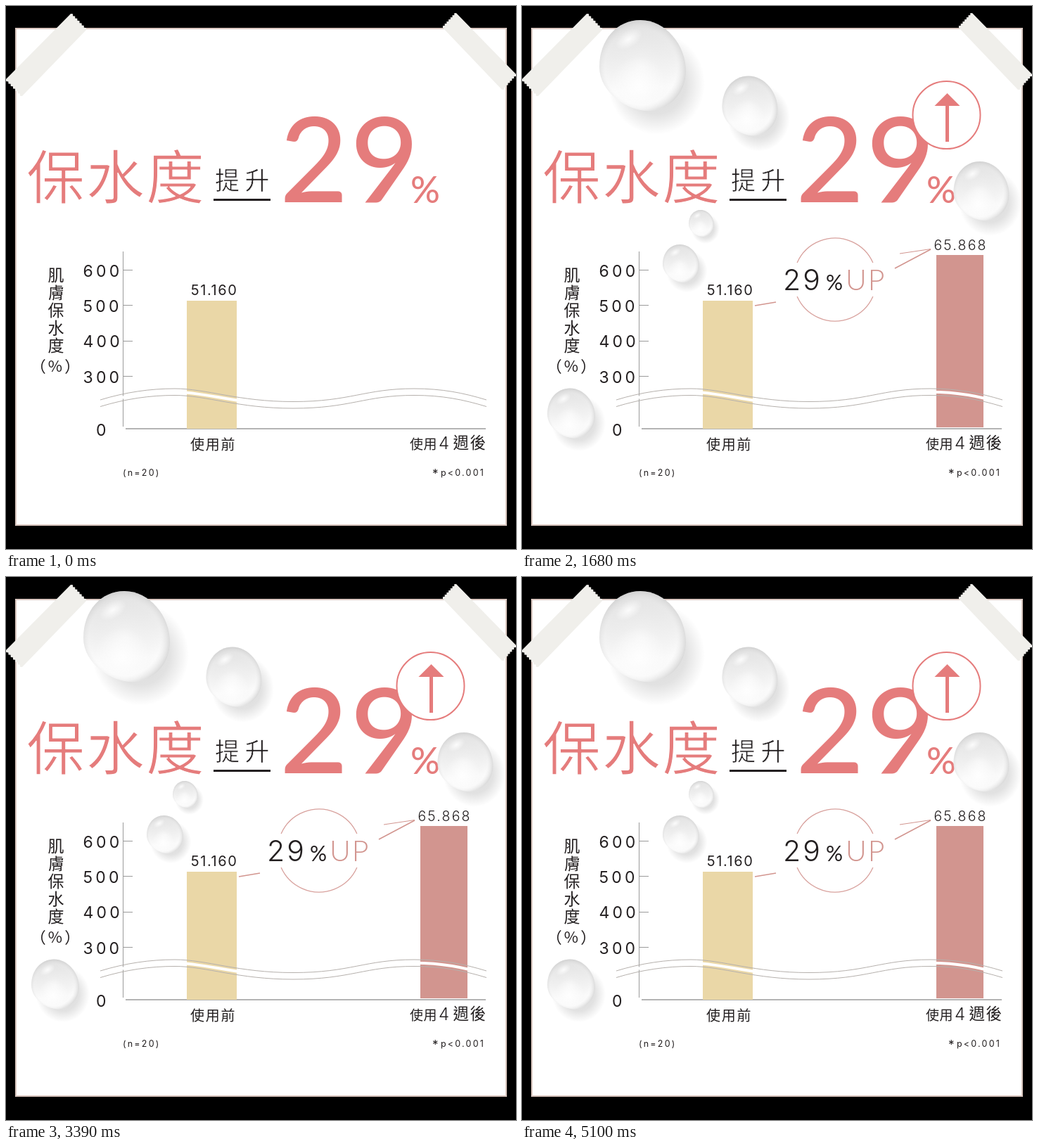
Recreate the animation shown at these times as an HTML page with a canvas. Size 725x772 px, loop 5.13 s.

```html
<!DOCTYPE html>
<html lang="zh-Hant">
<head>
<meta charset="utf-8">
<title>保水度提升</title>
<style>
html, body { margin: 0; width: 100%; height: 100%; overflow: hidden; background: #000; }
canvas { display: block; }
</style>
</head>
<body>
<canvas id="stage" width="725" height="772"></canvas>
<script>
const ctx = document.getElementById('stage').getContext('2d');
const CYCLE = 1710, STEP = 30;
const CORAL = '#e57c7c', INK = '#231f20', ROSE = '#d2958f', GREY = '#9b9b9b';
const CJK = '"Noto Sans CJK TC", "Noto Sans CJK", sans-serif';
const LATO = 'Lato, sans-serif', INTER = 'Inter, sans-serif';

const clamp = v => Math.max(0, Math.min(1, v));
const ramp = (t, a, b) => clamp((t - a) / (b - a));
const smooth = u => u * u * (3 - 2 * u);
const easeOut = u => 1 - (1 - u) ** 3;
const mix = (a, b, u) => a + (b - a) * u;

// Places the visible left edge (or middle) of the text at x.
function text(str, x, y, font, color = INK, spacing = 0, centred = false) {
  ctx.font = font;
  ctx.letterSpacing = spacing + 'px';
  ctx.fillStyle = color;
  const m = ctx.measureText(str);
  let left = x + m.actualBoundingBoxLeft;
  if (centred) left = x - (m.actualBoundingBoxRight - m.actualBoundingBoxLeft) / 2;
  ctx.fillText(str, left, y);
  return left;
}

// Text on white whose strokes are slimmed by a white outline.
function slimText(str, x, y, font, color, spacing, slim) {
  const left = text(str, x, y, font, color, spacing);
  ctx.strokeStyle = '#fff';
  ctx.lineWidth = slim;
  ctx.lineJoin = 'round';
  ctx.strokeText(str, left, y);
}

function line(x1, y1, x2, y2, color, width = 1) {
  ctx.strokeStyle = color;
  ctx.lineWidth = width;
  ctx.beginPath();
  ctx.moveTo(x1, y1);
  ctx.lineTo(x2, y2);
  ctx.stroke();
}

function faded(alpha, draw) {
  if (alpha <= 0) return;
  ctx.save();
  ctx.globalAlpha = alpha;
  draw();
  ctx.restore();
}

// A strip between two torn ends, each given as x1, y1, x2, y2.
function tape(a, b) {
  const torn = ([x1, y1, x2, y2]) => {
    const len = Math.hypot(x2 - x1, y2 - y1);
    for (let i = 0; i <= 14; i++) {
      const d = i % 2 ? 2 : 0;
      ctx.lineTo(mix(x1, x2, i / 14) + (y2 - y1) / len * d,
                 mix(y1, y2, i / 14) - (x2 - x1) / len * d);
    }
  };
  ctx.fillStyle = '#f0efeb';
  ctx.beginPath();
  torn(a);
  torn(b);
  ctx.fill();
}

function card() {
  ctx.fillStyle = '#000';
  ctx.fillRect(0, 0, 725, 772);
  ctx.fillStyle = '#fff';
  ctx.fillRect(13, 31, 699, 708);
  ctx.strokeStyle = '#d9c6bf';
  ctx.lineWidth = 2;
  ctx.strokeRect(14, 32, 697, 706);
}

function headline() {
  slimText('保水度', 30, 274, `400 83px ${CJK}`, CORAL, 2, 1.2);
  slimText('提升', 298, 261, `400 35px ${CJK}`, INK, 7.5, .7);
  ctx.fillStyle = INK;
  ctx.fillRect(295, 274, 81, 3);
  text('29', 396, 279, `500 168px ${LATO}`, CORAL, 3);
  text('%', 577, 280, `500 52px ${LATO}`, CORAL);
}

function wave(dy, color, width) {
  ctx.strokeStyle = color;
  ctx.lineWidth = width;
  ctx.beginPath();
  ctx.moveTo(134, 560 + dy);
  ctx.bezierCurveTo(170, 549 + dy, 205, 544 + dy, 240, 544 + dy);
  ctx.bezierCurveTo(285, 544 + dy, 330, 562.5 + dy, 408, 562.5 + dy);
  ctx.bezierCurveTo(490, 562.5 + dy, 510, 544 + dy, 580, 544 + dy);
  ctx.bezierCurveTo(620, 544 + dy, 650, 550 + dy, 683, 560 + dy);
  ctx.stroke();
}

function chart(t) {
  line(166.5, 349, 166.5, 598, GREY);
  line(170, 601, 682, 601, GREY, 1.4);
  [600, 500, 400, 300].forEach((n, i) => {
    const y = 375 + i * 50.4;
    line(166, Math.round(y) + .5, 180, Math.round(y) + .5, GREY);
    text(String(n), 110.5, y + 9.5, `400 23px ${INTER}`, INK, 4.2);
  });
  text('0', 129, 611, `400 23px ${INTER}`);

  [...'肌膚保水度'].forEach((c, i) =>
    text(c, 71, 390.5 + i * 25.2, `400 23px ${CJK}`, INK, 0, true));
  text('（%）', 70, 520, `400 22px ${CJK}`, INK, 3, true);

  ctx.fillStyle = '#ead7a7';
  ctx.fillRect(257, 419, 71, 182);
  const h = 245 * easeOut(ramp(t, 0, 450));
  ctx.fillStyle = ROSE;
  ctx.fillRect(589, 599 - h, 67, h);
  wave(4.7, '#fff', 4);
  wave(0, '#b5b0ac', 1);
  wave(9.5, '#b5b0ac', 1);

  text('51.160', 295.5, 411, `400 20px ${INTER}`, INK, 1.6, true);
  faded(ramp(t, 330, 510), () =>
    text('65.868', 622.5, 347, `300 19.5px ${INTER}`, INK, 2.2, true));

  text('使用前', 262, 631, `400 20px ${CJK}`, INK, 1.8);
  text('使用', 574, 630, `400 19px ${CJK}`, INK, .5);
  text('4', 616, 630, `300 24px ${INTER}`);
  text('週後', 635.5, 629, `400 22.5px ${CJK}`, INK, 1.6);
  text('(n=20)', 167, 668, `400 12.5px ${INTER}`, INK, 2.2);
  text('*', 606, 671, `400 17px ${INTER}`);
  text('p<0.001', 618, 668, `400 12.5px ${INTER}`, INK, 2.2);
}

function growth(t) {
  faded(ramp(t, 450, 660), () => {
    ctx.strokeStyle = '#d8a19d';
    ctx.lineWidth = 1.3;
    for (const turn of [0, Math.PI]) {
      ctx.beginPath();
      ctx.arc(445, 389, 59, turn + .42, turn + Math.PI - .42);
      ctx.stroke();
    }
    text('29', 374, 404, `300 41px ${INTER}`, INK, 3);
    text('%', 433, 404, `400 30px ${LATO}`);
    text('UP', 463, 404, `300 41px ${LATO}`, ROSE, 2);
  });
  faded(ramp(t, 690, 870), () => {
    line(331, 426, 361, 421, ROSE, 1.5);
    line(530, 373, 581, 346, ROSE, 1.5);
    line(537, 352, 581, 345.5, ROSE, 1);
  });
}

function arrowScale(t) {
  if (t < 1170) return 1.03 * Math.sin(ramp(t, 600, 1170) * Math.PI / 2) ** .6;
  if (t < 1440) return mix(1.03, .6, smooth(ramp(t, 1170, 1440)));
  return mix(.6, 1, smooth(ramp(t, 1440, 1680)));
}

function badge(t) {
  faded(ramp(t, 390, 570), () => {
    ctx.fillStyle = '#fff';
    ctx.strokeStyle = CORAL;
    ctx.lineWidth = 2;
    ctx.beginPath();
    ctx.arc(603.5, 155, 48, 0, Math.PI * 2);
    ctx.fill();
    ctx.stroke();
  });
  if (t <= 600) return;
  ctx.save();
  ctx.translate(604.5, 193);
  ctx.scale(1, arrowScale(t));
  ctx.fillStyle = CORAL;
  ctx.beginPath();
  ctx.moveTo(0, -69);
  ctx.lineTo(18, -51);
  ctx.lineTo(-18, -51);
  ctx.fill();
  ctx.fillRect(-2.5, -52, 5, 52);
  ctx.restore();
}

// Drops are drawn in a unit space around the middle of the body.
function blob() {
  ctx.beginPath();
  ctx.moveTo(-1, .03);
  ctx.bezierCurveTo(-1, -.57, -.59, -1, -.05, -1);
  ctx.bezierCurveTo(.52, -1, 1, -.46, 1, .13);
  ctx.bezierCurveTo(1, .64, .58, 1, .12, 1);
  ctx.bezierCurveTo(-.32, 1, -1, .62, -1, .03);
}

function glow(x, y, r, stops) {
  const g = ctx.createRadialGradient(x, y, 0, x, y, r);
  stops.forEach(([at, color]) => g.addColorStop(at, color));
  return g;
}

function drop(x, y, rx, ry, scale, alpha) {
  if (scale <= 0) return;
  faded(alpha, () => {
    ctx.translate(x + rx * .45, y + ry * .4);
    ctx.scale(scale * rx, scale * ry);
    ctx.translate(-.45, -.4);

    ctx.fillStyle = glow(.32, .4, 1.12,
      [[0, 'rgba(110,110,110,.26)'], [.6, 'rgba(110,110,110,.2)'], [1, 'rgba(110,110,110,0)']]);
    ctx.fillRect(-1, -1, 2.6, 2.7);

    blob();
    const body = ctx.createLinearGradient(-.1, -1, .1, 1);
    body.addColorStop(0, '#e2e2e2');
    body.addColorStop(.4, '#eeeeee');
    body.addColorStop(.75, '#fbfbfb');
    body.addColorStop(1, '#f8f8f8');
    ctx.fillStyle = body;
    ctx.fill();
    ctx.fillStyle = glow(-.04, .03, 1.1,
      [[0, 'rgba(255,255,255,.3)'], [.76, 'rgba(215,215,215,0)'], [1, 'rgba(165,165,165,.5)']]);
    ctx.fill();
    ctx.fillStyle = glow(-.1, .45, .65,
      [[0, 'rgba(255,255,255,.9)'], [1, 'rgba(255,255,255,0)']]);
    ctx.fill();

    ctx.translate(-.32, -.58);
    ctx.rotate(-.5);
    ctx.scale(1, .55);
    ctx.fillStyle = glow(0, 0, .34,
      [[0, 'rgba(255,255,255,.85)'], [1, 'rgba(255,255,255,0)']]);
    ctx.fillRect(-.4, -.4, .8, .8);
  });
}

const pop = (t, start) => t < start + 210
  ? 1.22 * ramp(t, start, start + 210)
  : mix(1.22, 1, smooth(ramp(t, start + 210, start + 360)));

// x, y, radii and start time
const DROPS = [
  [171.5, 84.5, 61.5, 64.5, 180],
  [324, 142, 39.5, 42.5, 470],
  [653, 263, 39.5, 42, 300],
  [226, 366, 26, 27, 400],
  [70, 579, 34, 35.5, 785]
];

function drops(t) {
  ctx.save();
  ctx.beginPath();
  ctx.rect(0, 19, 725, 753);
  ctx.clip();
  for (const [x, y, rx, ry, start] of DROPS) drop(x, y, rx, ry, pop(t, start), 1);
  drop(255, 309, 18, 19, 1, ramp(t, 700, 950));
  ctx.restore();
}

function render(t) {
  card();
  headline();
  chart(t);
  growth(t);
  badge(t);
  drops(t);
  tape([92, 11, 114, 34], [23, 128, 0, 104]);
  tape([621, 31, 640, 10], [725, 97, 705, 119]);
}

let begin;
function tick(now) {
  begin ??= now;
  const t = Math.floor((now - begin) / STEP + .01) * STEP;
  render(t % CYCLE);
  requestAnimationFrame(tick);
}
render(0);
requestAnimationFrame(tick);
</script>
</body>
</html>
```
